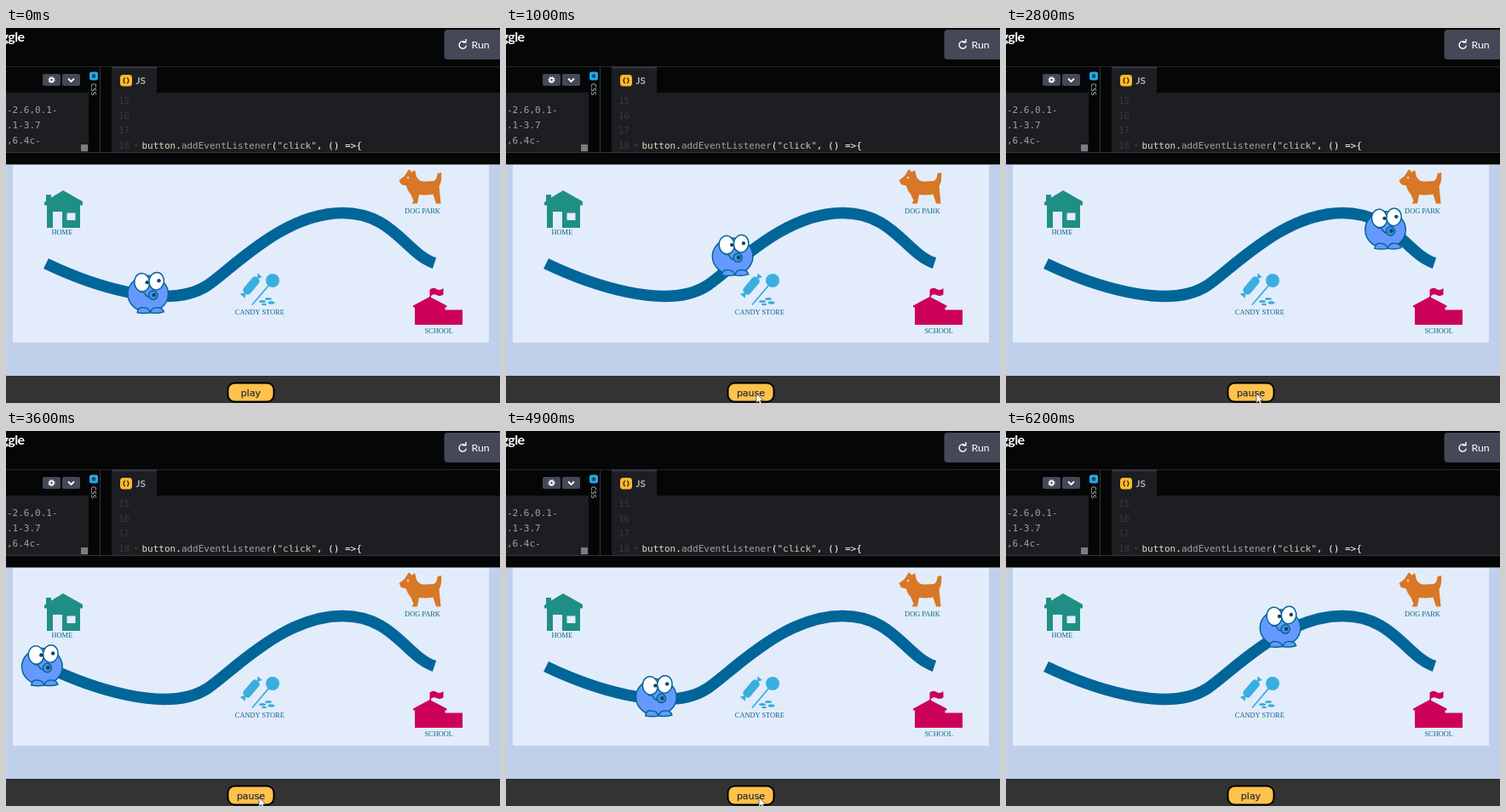
An HTML page that plays this animation: 580 by 441 pixels, repeating every 6.5 s.

```html
<!DOCTYPE html>
<html lang="en">
<head>
<meta charset="utf-8">
<title>Play and pause along a path</title>
<style>
  html, body { margin: 0; width: 100%; height: 100%; overflow: hidden; background: #050606; }
  svg { display: block; width: 580px; height: 441px; }
  .ui { font-family: Lato, sans-serif; fill: #fff; }
  .code { font: 11px "DejaVu Sans Mono", monospace; fill: #a0a1a4; white-space: pre; }
  .num { fill: #383a40; }
  .label { font: 8.4px "Liberation Serif", serif; fill: #0a6690; text-anchor: middle; }
  .button { font: 11px "DejaVu Sans", sans-serif; fill: #2e2c38; stroke: #2e2c38; stroke-width: .25; text-anchor: middle; }
</style>
</head>
<body>
<svg viewBox="0 0 580 441">
  <!-- editor -->
  <rect width="580" height="441" fill="#050606"/>
  <text class="ui" x="21.500" y="15.500" font-size="16" font-weight="700" letter-spacing="-.6" text-anchor="end">ggle</text>
  <rect x="514.500" y="2" width="70" height="35" rx="4" fill="#444857"/>
  <g fill="none" stroke="#fff" stroke-width="1.400">
    <path d="M539.500 17.200 A4.200 4.200 0 1 0 540.400 20.500"/>
    <path d="M536 16.800 H539.900 V13"/>
  </g>
  <text class="ui" x="546.500" y="24" font-size="12.300">Run</text>

  <path d="M0 45.500 H580" stroke="#25262a"/>
  <rect y="76" width="97" height="71" fill="#1d1e22"/>
  <rect x="124" y="46" width="53" height="32" fill="#1d1e22"/>
  <rect x="124" y="45" width="53" height="2.500" fill="#34363e"/>
  <rect x="124" y="76" width="456" height="71" fill="#1d1e22"/>
  <path d="M110.500 46 V147" stroke="#33353b"/>
  <path d="M0 146.500 H580" stroke="#33353b"/>

  <rect x="43" y="54" width="21" height="14" rx="2" fill="#444857"/>
  <rect x="66" y="54" width="21" height="14" rx="2" fill="#444857"/>
  <circle cx="53.500" cy="61" r="2.200" fill="none" stroke="#fff" stroke-width="1.800"/>
  <circle cx="53.500" cy="61" r="3.500" fill="none" stroke="#fff" stroke-width="1.100" stroke-dasharray="1.400 1.349"/>
  <path d="M73 59.500 L76.500 63 L80 59.500" fill="none" stroke="#fff" stroke-width="1.800"/>
  <rect x="88" y="137" width="8" height="8" fill="#7b7d82"/>

  <rect x="98" y="51.500" width="10" height="10" rx="2.500" fill="#23a9e8"/>
  <path d="M103 54 V59 M100.800 55.200 L105.200 57.800 M105.200 55.200 L100.800 57.800" stroke="#10303f" stroke-width="1.100"/>
  <text class="ui" transform="translate(100 65) rotate(90)" font-size="8" style="fill:#d0d1d4">CSS</text>

  <rect x="134" y="55" width="14" height="13.500" rx="3.500" fill="#fcb92c"/>
  <path d="M139.600 58.300 Q136.800 61.700 139.600 65.200 M142.400 58.300 Q145.200 61.700 142.400 65.200" fill="none" stroke="#29240f" stroke-width="1.300"/>
  <text class="ui" x="152.500" y="66" font-size="11.700" font-weight="700" style="fill:#aeb0b8">JS</text>

  <g class="code">
    <text x="1" y="100.300">-2.6,0.1-</text>
    <text x="1" y="118">.1-3.7</text>
    <text x="1" y="136">,6.4c-</text>
    <g class="num">
      <text x="132" y="88.500">15</text>
      <text x="132" y="106.500">16</text>
      <text x="132" y="124">17</text>
      <text x="132" y="142">18</text>
      <path d="M150.500 137 h4.500 l-2.250 3z"/>
    </g>
    <text x="159.500" y="142"><tspan fill="#e2deba">button</tspan><tspan fill="#fff">.</tspan>addEventListener<tspan fill="#fff">(</tspan><tspan fill="#c3c6ba">"click"</tspan><tspan fill="#fff">, () =&gt;{</tspan></text>
  </g>

  <!-- page -->
  <rect y="160" width="580" height="1" fill="#6d737e"/>
  <rect y="161" width="580" height="248" fill="#c1d0ea"/>
  <rect x="8" y="161" width="559" height="209" fill="#e3ecfa"/>
  <rect y="409" width="580" height="32" fill="#333"/>
  <path id="road" d="M47 277 C95 300 188 334 236 303 C265 284 325 217.500 395 217.500 C455 217.500 469 265 503 276.500" fill="none" stroke="#069" stroke-width="13.500"/>

  <g fill="#1f8f85">
    <path d="M45 208.500 V205 L47 203.500 V196 H53 V199.500 L67 191 L90 204 V208.500 H87 V235 H48 V208.500Z"/>
    <path d="M55 216 H66 V235 H55Z M71.500 217.500 H81.500 V226 H71.500Z" fill="#e3ecfa"/>
  </g>
  <text class="label" x="65.800" y="243">HOME</text>

  <path d="M473 166 L476.500 169.500 L480 167 L482 175 Q485 180.500 491 180.500 L502 180 Q506.500 178 506.500 171 L511 170 Q512 181 508.500 186 L510.500 206.500 H505 L501.500 195.500 Q493 197 485 196 L483 206.500 H476.500 L478.500 203 L475 195 Q471 191 470 185.500 L464 184 L461.500 179 L468 174Z" fill="#d87726"/>
  <circle cx="472" cy="176" r="1.200" fill="#f6e4cd"/>
  <text class="label" x="489" y="218">DOG PARK</text>

  <g fill="#3aaede">
    <g transform="translate(288 303) rotate(-50)">
      <rect x="-11.500" y="-5" width="23" height="10" rx="4"/>
      <path d="M10 0 L16 -3.500 V3.500Z M-10 0 L-16 -4 V4Z"/>
    </g>
    <path d="M309 302 L289 325.500" stroke="#3aaede" stroke-width="1.800"/>
    <circle cx="313" cy="297" r="8"/>
    <ellipse cx="308" cy="318.500" rx="4" ry="1.600"/>
    <ellipse cx="301" cy="321.500" rx="4" ry="1.600"/>
    <ellipse cx="311.500" cy="323" rx="4" ry="1.800"/>
    <ellipse cx="303" cy="325" rx="3" ry="1.200"/>
  </g>
  <text class="label" x="297.800" y="337">CANDY STORE</text>

  <g fill="#cd0059">
    <path d="M480 349 V328.500 H478 V326.500 L497.500 316 L517.500 326.500 V328.500 H515.500 V331.500 H536 V349Z"/>
    <path d="M497.500 307.500 Q501.500 304.500 505.500 307 T513.500 306 V313.500 Q509.500 316 505.500 314 T499 315 V319 H497.500Z"/>
  </g>
  <text class="label" x="508.200" y="359">SCHOOL</text>

  <g id="hero" fill="#69f" stroke="#069" stroke-width="1.500">
    <ellipse cy="1" rx="23.800" ry="21.500"/>
    <path d="M-12.500 23 Q-12 16.500 -6 17 Q1 17 2.500 23 Q-5 24.500 -12.500 23Z"/>
    <path d="M3 23 Q4 16.500 11 17 Q17 17 18.500 22 Q11 24.500 3 23Z"/>
    <ellipse cx="-7" cy="-12.500" rx="9" ry="10.800" fill="#fff" transform="rotate(-6 -7 -12.500)"/>
    <ellipse cx="10" cy="-14" rx="8.700" ry="10.300" fill="#fff" transform="rotate(8 10 -14)"/>
    <g fill="#05476b" stroke="none">
      <circle cx="-1" cy="-12.500" r="2.200"/>
      <circle cx="12.800" cy="-14.500" r="2.200"/>
    </g>
    <path d="M-9.500 -1 Q-5 -2.500 -3.500 1 T2 4.500" fill="none"/>
    <circle cx="6" cy="2.500" r="5.200" fill="#4b90dc"/>
    <circle cx="7" cy="2.300" r="2.300" fill="#05476b" stroke="none"/>
  </g>

  <rect x="260.500" y="417.500" width="54" height="22" rx="8" fill="#ffc24b" stroke="#000" stroke-width="2"/>
  <text id="label" class="button" x="287.500" y="433">play</text>
  <path id="cursor" d="M0 0 V11 L2.600 8.600 L4.500 12.800 L6.400 12 L4.600 7.900 H8Z" fill="#fff" stroke="#222" stroke-width=".600"/>
</svg>
<script>
const LOOP = 6500, STEP = 100, LAP = 3000;

// [time, playhead]: runs at normal speed, flat while paused
const playhead = [
  [0, 803], [335, 803], [1000, 1469], [1665, 2133], [2290, 2133],
  [2800, 2643], [3175, 3018], [3583, 3018], [4000, 3435], [4375, 3810],
  [4850, 3810], [5400, 4361], [5905, 4866], [LOOP, 4866]
];
// [time, x, y] of the pointer tip
const pointer = [
  [0, 302, 446], [100, 300, 442], [300, 294, 430], [3200, 294, 430],
  [3600, 297, 431], [5900, 297, 431], [6200, 301, 446], [LOOP, 301, 446]
];
const playing = [[335, 1665], [2290, 3175], [3583, 4375], [4850, 5905]];

const byId = id => document.getElementById(id);
const road = byId("road"), hero = byId("hero"), label = byId("label"), cursor = byId("cursor");
const length = road.getTotalLength();

function sample(track, t) {
  const i = track.findIndex(key => key[0] > t);
  const a = track[i - 1], b = track[i];
  const k = (t - a[0]) / (b[0] - a[0]);
  return a.slice(1).map((v, n) => v + (b[n + 1] - v) * k);
}

const place = (el, x, y) =>
  el.setAttribute("transform", `translate(${x.toFixed(2)} ${y.toFixed(2)})`);

function draw() {
  const now = performance.now() % LOOP;
  const t = Math.floor(now / STEP) * STEP;
  const [head] = sample(playhead, t);
  const p = road.getPointAtLength((head % LAP) / LAP * length);
  place(hero, p.x - 10, p.y - 3.5);
  place(cursor, ...sample(pointer, t));
  label.textContent = playing.some(([from, to]) => t >= from && t < to) ? "pause" : "play";
  requestAnimationFrame(draw);
}
draw();
</script>
</body>
</html>
```
